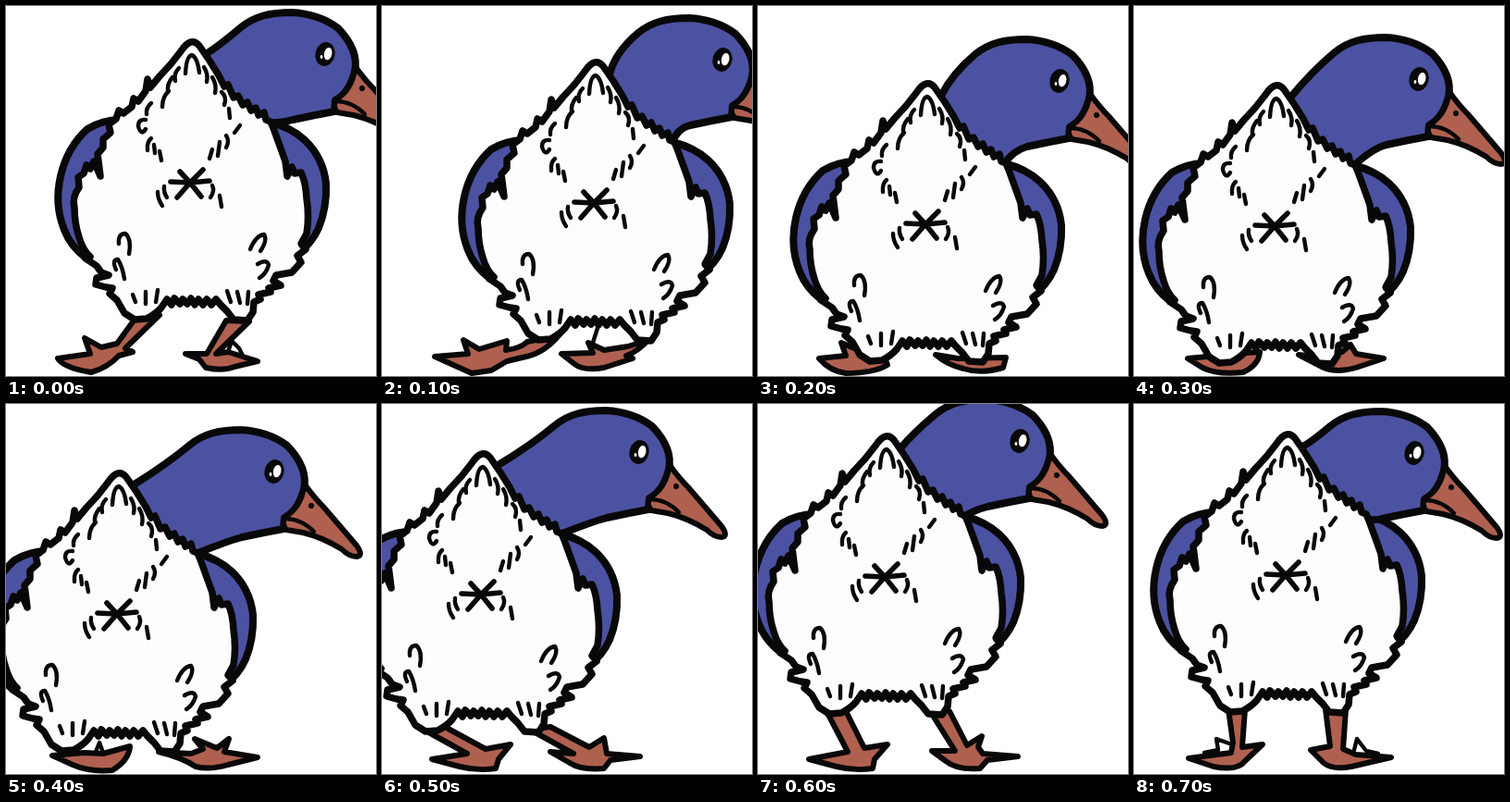
These frames come from a looping animation (400 by 400 pixels, 800 ms). An HTML page:

```html
<!DOCTYPE html>
<html lang="en">
<head>
<meta charset="utf-8">
<title>Waddling duck</title>
<style>
  html, body { margin: 0; width: 100%; height: 100%; overflow: hidden; background: #fff; }
  svg { display: block; width: 100vw; height: 100vh; }
  path, ellipse { stroke: #080808; stroke-linejoin: round; stroke-linecap: round; }
  .blue { fill: #4c52a2; stroke-width: 8; }
  .white { fill: #fdfdfd; stroke-width: 7.5; }
  .orange { fill: #b0604f; stroke-width: 6; }
  .ink { fill: none; stroke-width: 4.4; }
  .star { fill: none; stroke-width: 5.6; }
  .pose { visibility: hidden; animation: show 800ms step-end infinite; }
  @keyframes show {
    0% { visibility: visible; }
    12.5%, 100% { visibility: hidden; }
  }
</style>
</head>
<body>
<svg viewBox="0 0 400 400">
  <defs>
    <g id="wings" class="blue">
      <path d="M122,123 Q105,123 88,133 Q66,153 59,184 Q52,215 63,242 Q70,260 86,272 L110,200Z"/>
      <path d="M284,125 Q308,131 323,145 Q343,164 346,192 Q347,218 338,240 Q331,256 314,270 L290,200Z"/>
    </g>
    <g id="body">
      <path class="white" d="M200,39 Q195,40 189,49 L178,63 L166,76 L156,88 L153,79 L151,92 L143,103
        L138,100 L136,109 L127,116 L122,113 L119,122 L111,128 L113,137 L105,144 L105,153 L99,160
        L102,184 L95,168 L91,176 L87,172 L84,181 L78,185 L79,196 Q71,207 74,218 Q74,235 79,250
        Q83,264 91,271 L86,273 L98,281 L103,288 L111,291 L98,294 L97,301 L108,304 L115,305 L112,311
        L120,318 L128,332 L139,339 L152,338 Q162,333 168,326 L174,317 L179,323 L182,316 L188,322
        L191,317 L196,322 L200,316 L204,323 L208,317 L213,323 L217,317 L222,323 L227,317 L232,323
        L239,330 L246,339 L261,340 L267,331 L268,320 L275,317 L273,312 L286,309 L284,305 L297,302
        L289,297 L292,291 L309,288 L319,277 L315,270 L324,263 L319,257 L325,246 Q328,228 325,208
        Q324,190 319,180 L312,181 L309,174 L304,184 L302,168 L297,154 L293,143 L289,132 L286,125
        L281,123 L279,115 L273,118 L270,110 L265,113 L261,104 L256,107 L251,97 L246,99 L240,85
        L236,87 L230,75 L220,59 L209,43 Q205,38 200,39Z"/>
      <path class="ink" d="M194,73 Q195,54 201,53 Q207,56 209,72 M187,67 Q181,73 183,81
        M180,77 Q174,84 175,92 M176,92 Q169,98 169,109 M157,105 Q151,110 152,117
        M151,123 Q143,122 143,130 Q146,141 151,133 M157,143 Q152,147 153,156 M160,150 L161,159
        M166,157 L168,167
        M214,66 Q219,74 217,82 M223,77 Q228,85 226,94 M233,93 Q239,98 236,107 M241,111 L242,121
        M253,129 L247,137 M238,140 Q242,146 238,153 M231,147 L229,162 M223,155 L220,165
        M164,201 Q164,209 169,216 M171,195 Q170,201 174,207 M223,194 Q226,200 221,207 M231,205 L233,217
        M122,257 Q121,246 129,246 Q136,252 133,268 M119,285 Q114,274 121,274 Q126,282 128,295
        M264,263 Q270,248 279,247 Q283,253 275,265 M272,279 Q282,273 284,280 Q281,290 274,294
        M137,312 L140,320 M151,309 L151,322 M164,307 L162,320
        M239,308 L243,320 M250,309 L253,321 M262,309 L261,322"/>
      <path class="star" d="M178,190 L199,191 L220,189 M188,179 L199,191 L211,206 M213,177 L199,191 L185,207"/>
    </g>
    <g id="face">
      <path class="orange" d="M33,14 Q43,28 53,38 Q72,60 89,80 Q97,91 89,92 Q81,92 73,84 Q52,71 31,66 L13,63
        Q8,57 11,49 Q28,41 33,14Z"/>
      <path class="ink" d="M12,51 Q29,51 43,65"/>
      <ellipse cx="40" cy="37" rx="2.6" ry="2.8" fill="#080808"/>
      <ellipse rx="10" ry="12.5" transform="rotate(14)" fill="#080808"/>
      <ellipse cx="3" cy="-1" rx="4.2" ry="6.8" transform="rotate(12)" style="fill:#fff;stroke:none"/>
      <ellipse cx="-4" cy="3" rx="1.4" ry="2" style="fill:#fff;stroke:none"/>
    </g>
  </defs>
</svg>
<script>
  const svg = document.querySelector('svg');

  // body: shift of the body, eye: centre of the eye, feet: outlines, ink: spurs
  const poses = [
    { body: [0, 0], eye: [345, 52],
      feet: `M141,336 L120,365 L103,369 L85,359 L91,376 L56,381 Q62,391 92,396 Q110,391 122,378
        L137,374 L129,370 L166,334Z
        M238,340 L217,376 L194,376 L209,382 L216,391 Q235,395 247,390 L272,384 L240,374 L227,376 L263,341Z`,
      ink: 'M240,374 L244,362 L252,370 L257,380 L270,383' },
    { body: [30, 22], eye: [368, 58],
      feet: `M57,379 L93,376 L88,361 L105,371 L135,362 L134,372 Q150,370 157,363 L185,357 L196,350
        Q180,372 160,378 L135,384 L118,394 L97,397Z
        M194,376 L228,375 L223,364 L240,372 L266,368 L288,361 Q276,374 264,378 L271,381 L240,391
        Q218,395 208,387Z`,
      ink: 'M228,364 L234,345' },
    { body: [-18, 45], eye: [326, 81],
      feet: `M66,381 L95,378 L90,364 L104,370 L135,376 L140,388 Q125,397 95,397 Q78,395 66,381Z
        M192,377 L216,381 L268,380 L265,391 Q240,398 222,392 Q205,388 192,377Z`, ink: '' },
    { body: [-47, 47], eye: [308, 79],
      feet: `M58,381 L90,378 L96,368 L106,376 L136,374 Q135,388 118,396 Q90,399 74,391Z
        M178,377 L205,380 L225,374 L234,366 L240,376 L270,381 L240,391 Q220,397 205,391Z`, ink: '' },
    { body: [-79, 36], eye: [290, 73],
      feet: `M50,380 L85,377 L105,378 L134,370 Q133,385 115,396 Q90,398 72,390Z
        M165,376 L200,378 L213,373 L204,362 L228,372 L241,362 L236,376 L272,382 L240,390
        Q220,396 205,392 Q190,382 165,376Z`,
      ink: 'M97,376 L101,366 L105,377' },
    { body: [-92, 15], eye: [278, 52],
      feet: `M45,352 L92,378 L54,384 L84,392 Q104,397 123,394 L126,384 L139,368 L112,373 L66,348Z
        M160,352 L207,378 L182,376 L203,388 Q215,396 240,394 L247,385 L279,381 L243,378 L240,361
        L224,371 L182,349Z`, ink: '' },
    { body: [-62, -4], eye: [283, 40],
      feet: `M74,332 L97,376 L55,384 L85,392 Q105,397 124,394 L126,384 L140,368 L115,372 L95,332Z
        M186,332 L213,375 L188,375 L203,386 Q215,396 240,394 L248,385 L281,381 L243,378 L238,371
        L242,359 L226,369 L207,332Z`, ink: '' },
    { body: [-35, -6], eye: [303, 53],
      feet: `M102,330 L107,366 L105,377 L59,383 L86,392 Q112,397 120,386 L139,368 L117,371 L120,330Z
        M207,330 L212,370 L191,374 L205,388 Q215,396 235,392 L278,382 L240,379 L226,373 L229,330Z`,
      ink: 'M103,367 L89,362 L91,374 L76,377 M238,374 L241,362 L251,375 L264,378' }
  ];

  const at = (name, [x, y]) => `<use href="#${name}" x="${x}" y="${y}"/>`;

  // The neck stretches between the body and the freely moving head.
  function head([bx, by], [ex, ey]) {
    const b = (x, y) => `${bx + x},${by + y} `;
    const e = (x, y) => `${ex + x},${ey + y} `;
    return `M${b(200, 60)}L${b(216, 52)}Q${e(-116, -8)}${e(-91, -29)}` +
      `C${e(-76, -41)}${e(-60, -45)}${e(-36, -45)}C${e(-15, -44)}${e(2, -37)}${e(14, -28)}` +
      `Q${e(37, -4)}${e(32, 19)}Q${e(26, 42)}${e(11, 50)}L${e(10, 62)}` +
      `Q${e(-12, 66)}${e(-35, 71)}Q${e(-50, 75)}${b(284, 126)}L${b(255, 125)}Z`;
  }

  poses.forEach(({ body, eye, feet, ink }, i) => {
    svg.insertAdjacentHTML('beforeend',
      `<g class="pose" style="animation-delay:${(i - poses.length) * 100}ms">
        <path class="orange" d="${feet}"/><path class="ink" d="${ink}"/>
        ${at('wings', body)}<path class="blue" d="${head(body, eye)}"/>
        ${at('face', eye)}${at('body', body)}</g>`);
  });
</script>
</body>
</html>
```
